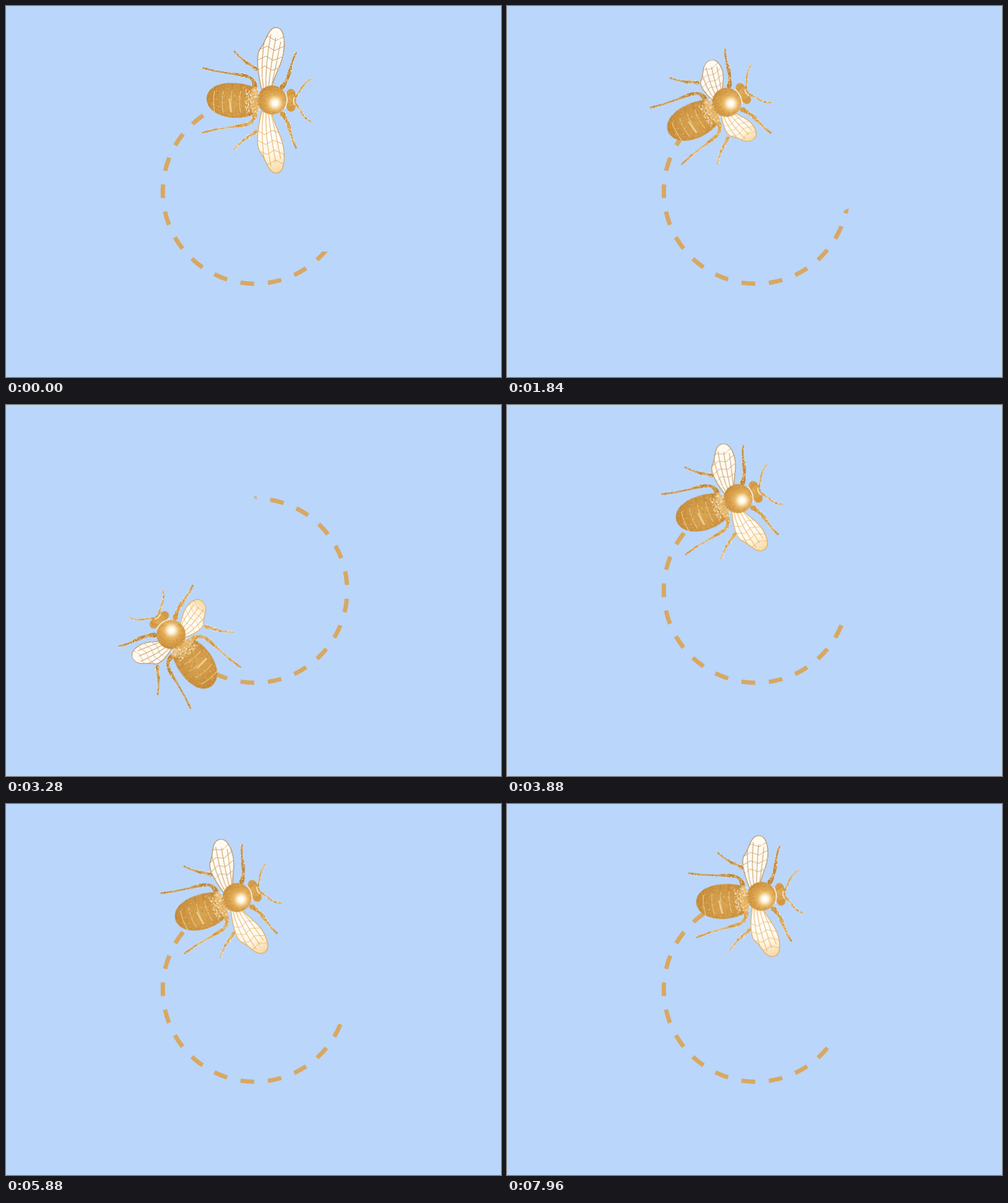
Animation of 800 by 600 pixels, one loop 8 s. Source, as an HTML page with a canvas:

```html
<!DOCTYPE html>
<html>
<head>
<meta charset="utf-8">
<style>
html, body { margin: 0; width: 100%; height: 100%; overflow: hidden; background: #bad6fb; }
canvas { display: block; }
</style>
</head>
<body>
<canvas id="stage" width="800" height="600"></canvas>
<script>
const SKY = '#bad6fb', AXIS = 152.5, TAU = Math.PI * 2;
const stage = document.getElementById('stage').getContext('2d');

let seed = 7;
const rnd = () => (seed = seed * 16807 % 2147483647) / 2147483647;
const pick = list => list[Math.floor(rnd() * list.length)];

function sprite(paint) {
  const c = document.createElement('canvas');
  c.width = 800;
  c.height = 600;
  const g = c.getContext('2d');
  g.lineCap = g.lineJoin = 'round';
  paint(g);
  return c;
}

// Paints the upper half, then its mirror image below the body axis.
function bothSides(g, paint) {
  for (const side of [1, -1]) {
    g.save();
    g.translate(0, AXIS);
    g.scale(1, side);
    g.translate(0, -AXIS);
    paint(side > 0);
    g.restore();
  }
}

function line(g, d, width, color) {
  g.lineWidth = width;
  g.strokeStyle = color;
  g.stroke(new Path2D(d));
}

function oval(g, x, y, rx, ry, fill) {
  g.fillStyle = fill;
  g.beginPath();
  g.ellipse(x, y, rx, ry, 0, 0, TAU);
  g.fill();
}

function glow(g, x, y, r, ...colors) {
  const fill = g.createRadialGradient(x, y, 0, x, y, r);
  colors.forEach((c, i) => fill.addColorStop(i / (colors.length - 1), c));
  return fill;
}

// Engraved speckle that stays inside what is already painted.
function grain(g, count, colors) {
  g.globalCompositeOperation = 'source-atop';
  for (let i = 0; i < count; i++) {
    g.fillStyle = pick(colors);
    g.fillRect(305 + 195 * rnd(), 30 + 245 * rnd(), 1.5, 1.3);
  }
  g.globalCompositeOperation = 'source-over';
}

// A tapering, jointed limb along a cubic curve, with a speckled pale fringe.
function limb(g, size, color, a, b, c, d) {
  const at = (u, k) => {
    const v = 1 - u;
    return v * v * v * a[k] + 3 * v * v * u * b[k] + 3 * v * u * u * c[k] + u * u * u * d[k];
  };
  const width = u => size * (1 - 0.65 * u) * (0.8 + 0.2 * Math.cos(13 * u));
  const dots = (count, spread, r, colors) => {
    for (let i = 0; i < count; i++) {
      const u = i / count, w = width(u) * spread;
      oval(g, at(u, 0) + w * (rnd() - 0.5), at(u, 1) + w * (rnd() - 0.5), r(u), r(u), pick(colors));
    }
  };
  dots(110, 1.5, () => 0.9, ['#fff1d6', '#f3d9ac']);
  dots(120, 0, u => width(u) / 2, [color]);
  dots(100, 0.9, () => 0.7, ['#ffeccb', '#f2cd8c', color, '#b0752a']);
}

const wings = sprite(g => bothSides(g, upper => {
  const d = 'M413 134C408 112 402 76 413 66C420 58 424 33 438 35C452 37 453 70 443 95C435 114 431 122 429 134Z';
  const outline = new Path2D(d), edge = upper ? '#b98b4c' : '#e0a750';
  g.fillStyle = upper ? '#fffaf2' : glow(g, 424, 100, 75, '#fff', '#fff6e4', '#f3cd8c');
  g.fill(outline);
  g.save();
  g.clip(outline);
  for (let i = 0; i < 4; i++) {
    line(g, `M${416 + 4 * i} 134Q${410 + 9 * i} 95 ${420 + 8 * i} ${40 + 6 * i}`, 0.9, edge);
    const y = 52 + 16 * i;
    line(g, `M404 ${y + 5}L${424 - 2 * i} ${y - 3}L${436 - 2 * i} ${y + 4}L452 ${y - 4}`, 0.8, edge);
  }
  g.restore();
  line(g, d, 1.2, edge);
  grain(g, 350, ['#ecc37b66', '#fffc', '#fffc']);
}));

const body = sprite(g => {
  bothSides(g, upper => {
    const color = upper ? '#bf8637' : '#d9a04a';
    limb(g, 7, color, [402, 130], [400, 105], [375, 116], [317, 100]);
    limb(g, 5, color, [404, 102], [396, 94], [384, 92], [369, 73]);
    limb(g, 7, color, [446, 131], [460, 116], [457, 100], [469, 75]);
    limb(g, 2.8, '#d6a45a', [468, 147], [480, 133], [480, 122], [495, 118]);
  });

  // Abdomen and its bands
  const abdomen = new Path2D('M324 150C326 117 385 121 403 133V173C385 187 326 184 324 150Z');
  g.fillStyle = glow(g, 368, 156, 48, '#d9a550', '#d09744', '#c18632');
  g.fill(abdomen);
  g.save();
  g.clip(abdomen);
  for (let x = 335; x < 400; x += 14) {
    line(g, `M${x + 4} 124Q${x - 3} 153 ${x + 4} 182`, 2, '#b0762a55');
    line(g, `M${x + 2} 138Q${x - 1} 153 ${x + 2} 172`, 1.3, '#f3cf90');
  }
  g.restore();

  // Waist, thorax, head
  oval(g, 402, 153, 7, 23, '#e4b465');
  oval(g, 430, 152, 23.5, 23.5, glow(g, 435, 156, 30, '#edbf70', '#dfa852', '#c98b36'));
  bothSides(g, () => oval(g, 460.5, 143.5, 7.5, 9.5, '#d59a43'));
  oval(g, 462, AXIS, 7, 9, '#dca752');

  grain(g, 6500, ['#a9702455', '#bf843455', '#e9b86a66', '#f8dca366', '#d0963f66']);

  // Pale fuzz at the joints and the shine on the back
  for (let i = 0; i < 150; i++) {
    g.fillStyle = pick(['#ffe9bf', '#f3cf8f', '#fff']);
    g.fillRect(386 + 23 * rnd(), 133 + 40 * rnd(), 1.3, 2.2 * rnd());
  }
  line(g, 'M452 140Q457 152 451 166M466 148Q463 154 467 160', 1.6, '#fff0cf');
  oval(g, 434, 156, 17, 17, glow(g, 435, 157, 17, '#fff', '#fffaf0', '#fbe3b4cc', '#efc17666', '#e8ad5500'));
  line(g, 'M361 150L363 171', 1.6, '#f8dcaa');
});

function trail() {
  const pitch = 22.22;
  stage.beginPath();
  stage.arc(402.4, 300.2, 149, -TAU / 4, -TAU * 1.25, true);
  stage.setLineDash([pitch, pitch]);
  stage.lineWidth = 7;
  stage.strokeStyle = '#d8a861';
  stage.stroke();
}

function draw(now) {
  const step = Math.floor(now % 8000 / 40);
  stage.setTransform(1, 0, 0, 1, 0, 0);
  stage.fillStyle = SKY;
  stage.fillRect(0, 0, 800, 600);
  trail();

  stage.translate(400, 300);
  stage.rotate(step * TAU / 50);
  stage.fillRect(0, -200, 250, 297); // hides the trail ahead of the bee
  stage.translate(-400, -300);

  stage.save();
  stage.translate(0, AXIS);
  stage.scale(1, 0.81 + 0.192 * Math.cos(step * TAU / 4 + 0.14));
  stage.drawImage(wings, 0, -AXIS);
  stage.restore();
  stage.drawImage(body, 0, 0);
}

let start;
function tick(now) {
  start ??= now;
  draw(now - start);
  requestAnimationFrame(tick);
}
requestAnimationFrame(tick);
</script>
</body>
</html>
```
